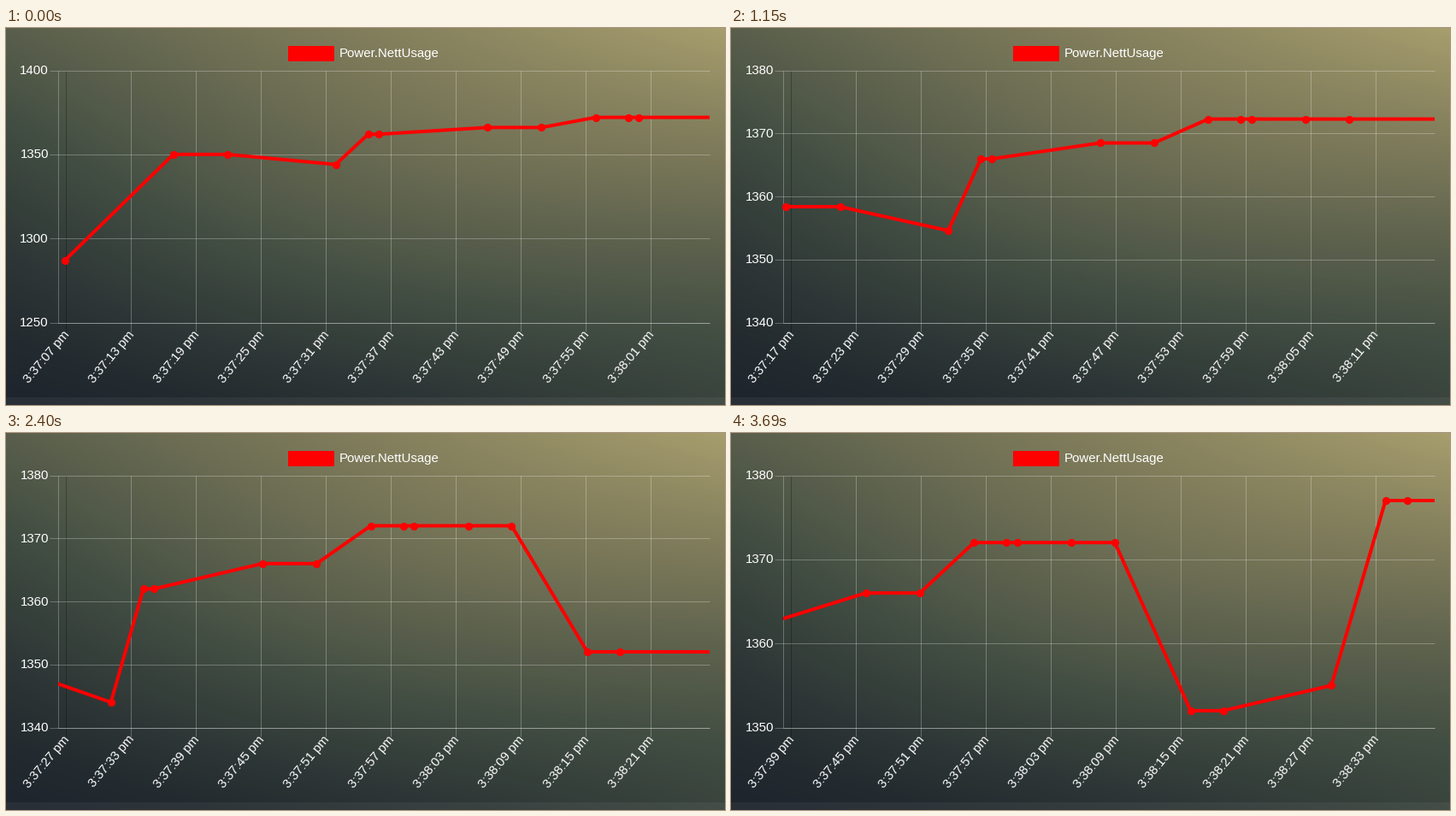
A matplotlib script for the animation above (3790 ms loop, 841 by 441 pixels).

```python
import math

import matplotlib.pyplot as plt
import numpy as np
from matplotlib.animation import FuncAnimation
from matplotlib.collections import LineCollection
from matplotlib.colors import LinearSegmentedColormap
from matplotlib.patches import Rectangle

W, H, DPI = 841, 441, 100
LOOP_MS, TICK_MS = 3790, 10
LEFT, RIGHT, TOP, BOTTOM = 61.5, 823, 49.5, 344.5
FIRST_TICK, TICK_GAP, TICK_SECONDS, TICKS = 70.5, 76, 6, 10
PX_PER_SECOND = TICK_GAP / TICK_SECONDS
SECONDS_PER_STEP = 0.865
START_SECOND = 7.118      # time under the first tick, counted from 3:37:00
ARRIVAL_DELAY = 2.0       # a reading shows up this long after it was taken

# the value at each change, and the times it was read again unchanged
CHANGES = {7: 1287, 17: 1350, 32: 1344, 35: 1362, 46: 1366, 56: 1372,
           76: 1352, 89: 1355, 94: 1377}
REPEATS = {22, 36, 51, 59, 60, 65, 69, 79, 96}
READ_AT = np.array(sorted(REPEATS | set(CHANGES)))
VALUES = np.array([CHANGES[max(c for c in CHANGES if c <= s)]
                   for s in READ_AT])

# the pace of the steps drifts slightly between these points
STEP_MS = np.round(np.interp(range(38), [0, 1, 12, 24, 37],
                             [0, 50, 1150, 2400, 3690]), -1)

RED = "#ff0000"
GRID = (1, 1, 1, 0.27)
FONT = dict(family="Liberation Sans", size=15 * 72 / DPI, color="white")


def px(n):
    return n * 72 / DPI


def backdrop():
    x = np.linspace(0, 1, W)[None, :]
    y = np.linspace(0, 1, H)[:, None]
    top, low = 0.48 + 0.51 * x, 0.02 + 0.25 * x ** 1.3
    light = low + (top - low) * (1 - y) ** 1.3
    light = light + 0.1 * np.sin(math.pi * x) * np.sin(math.pi * y)
    colors = LinearSegmentedColormap.from_list(
        "dusk", ["#1c222b", "#414d42", "#787658", "#a99f6e"])
    img = colors(light)[..., :3]
    img[432:] += (1 - img[432:]) * 0.05
    return img


def time_at(step):
    return START_SECOND + step * SECONDS_PER_STEP


def readings(step):
    """Times and values in the window, led by the last one that left it."""
    now = time_at(step)
    edge = now + (RIGHT - FIRST_TICK) / PX_PER_SECOND
    first = max(np.searchsorted(READ_AT, now, side="right") - 1, 0)
    last = np.searchsorted(READ_AT, edge - ARRIVAL_DELAY, side="right")
    return READ_AT[first:last], VALUES[first:last]


def scale_at(step):
    """Lowest value, highest value and spacing that fit the readings."""
    values = readings(step)[1]
    low, high = int(values.min()), int(values.max())
    spacing = 50 if high - low > 40 else 10
    return low // spacing * spacing, -(-high // spacing) * spacing, spacing


def value_to_y(value, scale):
    low, high, _ = scale
    return BOTTOM - (value - low) / (high - low) * (BOTTOM - TOP)


def curve(step):
    now = time_at(step)
    seconds, values = readings(step)
    y = value_to_y(values, scale_at(step))
    # a rescale takes one second from the moment a reading leaves
    old = value_to_y(values, scale_at(step - 1))
    y = old + (y - old) * np.clip(now - seconds[0], 0, 1)
    return FIRST_TICK + (seconds - now) * PX_PER_SECOND, y


fig = plt.figure(figsize=(W / DPI, H / DPI), dpi=DPI)
fig.figimage(backdrop(), zorder=-1)
ax = fig.add_axes([0, 0, 1, 1])
ax.set(xlim=(0, W), ylim=(H, 0))
ax.axis("off")


def add_lines(segments, color=GRID):
    return ax.add_collection(
        LineCollection(segments, colors=[color], linewidths=px(1)))


tick_x = FIRST_TICK + TICK_GAP * np.arange(TICKS)
columns = [[(x, TOP), (x, BOTTOM + 10)] for x in tick_x]
add_lines(columns[1:])
add_lines(columns[:1], (0, 0, 0, 0.27))
add_lines([[(LEFT, TOP), (LEFT, BOTTOM)], [(LEFT, BOTTOM), (RIGHT, BOTTOM)]])
rows = add_lines([])

ax.add_patch(Rectangle((330, 21), 54, 18, color=RED, lw=0))
ax.text(389.5, 34, "Power.NettUsage", **FONT)

angle = math.radians(50)
time_labels = [
    ax.text(x + 5.2 * math.sin(angle), 355 + 5.2 * math.cos(angle), "",
            rotation=50, rotation_mode="anchor", ha="right", va="baseline",
            **FONT)
    for x in tick_x]
value_labels = [ax.text(50, 0, "", ha="right", va="baseline", **FONT)
                for _ in range(5)]

line, = ax.plot([], [], color=RED, lw=px(4), solid_joinstyle="miter",
                solid_capstyle="butt", zorder=3)
line.set_clip_path(Rectangle((LEFT - 0.5, TOP - 2), RIGHT - LEFT + 0.5,
                             BOTTOM - TOP + 4, transform=ax.transData))
dots, = ax.plot([], [], "o", color=RED, ms=px(9.2), mew=0, zorder=4)
dots.set_snap(False)


def draw_scale(scale):
    low, high, spacing = scale
    values = range(low, high + 1, spacing)
    rows.set_segments([[(LEFT - 10, value_to_y(v, scale)),
                        (RIGHT, value_to_y(v, scale))] for v in values])
    for label in value_labels:
        label.set_text("")
    for label, value in zip(value_labels, values):
        label.set_text(str(value))
        label.set_y(value_to_y(value, scale) + 4.5)


def update(frame):
    step = int(np.searchsorted(STEP_MS, frame * TICK_MS, side="right")) - 1
    draw_scale(scale_at(step))

    first = math.floor(time_at(step))
    for i, label in enumerate(time_labels):
        minute, second = divmod(first + i * TICK_SECONDS, 60)
        label.set_text(f"3:{37 + minute}:{second:02d} pm")

    x, y = curve(step)
    inside = (x >= LEFT - 0.5) & (x <= RIGHT)
    dots.set_data(x[inside], y[inside])
    # the latest value is held up to the right edge
    line.set_data(np.append(x, RIGHT + 5), np.append(y, y[-1]))
    return line, dots


anim = FuncAnimation(fig, update, frames=LOOP_MS // TICK_MS, interval=TICK_MS,
                     repeat=True, repeat_delay=0, blit=False)
plt.show()
```
